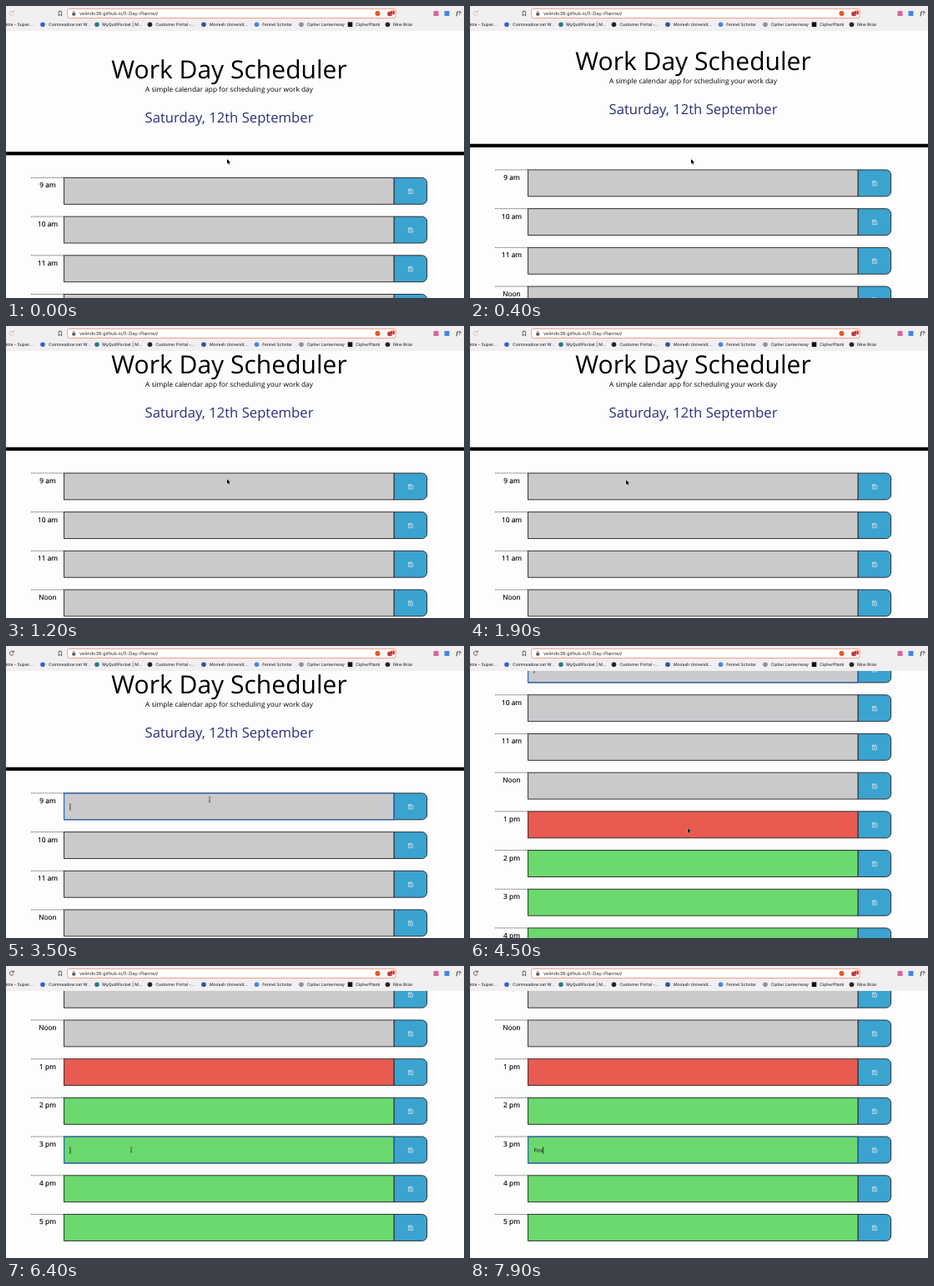
Recreate the animation shown at these times as an HTML page. Size 549 by 351 pixels, loop 8000 ms.

```html
<!DOCTYPE html>
<html lang="en">
<head>
<meta charset="utf-8">
<title>Work Day Scheduler</title>
<style>
  html, body { margin: 0; width: 100%; height: 100%; overflow: hidden; background: #fdfcfe; }
  svg { display: block; width: 549px; height: 351px; text-rendering: geometricPrecision; }
  #page { font: 8.34px "Open Sans", sans-serif; text-anchor: middle; }
  #rows text { stroke: #000; stroke-width: .18; }
  #bar { font: 500 5px Inter, sans-serif; fill: #2c2c2e; }
  .line { fill: none; stroke: #222; stroke-width: .9; }
</style>
</head>
<body>
<svg viewBox="0 0 549 351">
  <g id="page">
    <text x="267.5" y="86.5" font-size="30.05">Work Day Scheduler</text>
    <text x="267.5" y="102.8">A simple calendar app for scheduling your work day</text>
    <text x="267.5" y="139.5" font-size="16.68" fill="#2b3178">Saturday, 12th September</text>
    <rect y="175.2" width="549" height="4.2"/>
    <g id="rows"></g>
    <g id="focus">
      <rect x="69.6" y=".2" width="395.6" height="31.9" fill="none" stroke="#1f6cc4"/>
      <text id="typed" x="76.6" y="18.9" font-size="6.67" text-anchor="start"></text>
      <rect id="caret" y="12.4" width=".7" height="8.6"/>
    </g>
  </g>
  <g id="bar">
    <rect width="549" height="30" fill="#f2eff2"/>
    <g id="reload" fill="none" stroke-width=".8">
      <path d="M9 7.2A2.6 2.6 0 1 0 9.4 9.4M9.4 5.6V7.6H7.4"/>
    </g>
    <path d="M63.2 6.4h3.4v5.4l-1.7-1.5-1.7 1.5z" fill="none" stroke="#444" stroke-width=".8"/>
    <rect x="73.8" y="3.3" width="393.4" height="11.2" rx="1.8" fill="#fff" stroke="#ee9673" stroke-width=".9"/>
    <rect x="79.4" y="8.3" width="3.8" height="3.1" rx=".4" fill="#555"/>
    <path d="M80.2 8.4V7.3a1.1 1.1 0 0 1 2.2 0v1.1" fill="none" stroke="#555" stroke-width=".6"/>
    <text x="88" y="11" font-size="5.7" font-weight="400">velindo38.github.io/5-Day-Planner/</text>
    <path d="M453 4V14" stroke="#ddd" stroke-width=".6"/>
    <circle cx="445.5" cy="9" r="3" fill="#e4512f"/>
    <circle cx="460" cy="9.4" r="2.9" fill="#b8404a"/>
    <rect x="461" y="5.4" width="5" height="4.6" rx="1" fill="#e5342b"/>
    <text x="462.3" y="9.1" font-size="3.8" fill="#fff">1</text>
    <rect x="512.5" y="6" width="6" height="6" fill="#d568a0"/>
    <rect x="525.5" y="6" width="6" height="6" rx=".8" fill="#4585e2"/>
    <text x="539.5" y="11.2" font-size="6.4" font-style="italic" font-weight="600">f?</text>
    <text x="32" y="24.2" text-anchor="end">Note - Super...</text>
    <g id="marks"></g>
  </g>
  <g id="arrow">
    <path d="M0 0V5.6L1.3 4.5 2.2 6.5 3.2 6 2.3 4.1H4z" stroke="#fff" stroke-width=".7" paint-order="stroke"/>
  </g>
  <path id="beam" d="M-1.3-3Q0-3 0-2.3Q0-3 1.3-3M0-2.3V2.3M-1.3 3Q0 3 0 2.3Q0 3 1.3 3M-.7 .9H.7" fill="none" stroke="#333" stroke-width=".6"/>
</svg>
<script>
const el = id => document.getElementById(id);
const LOOP = 8000, TOP = 206.2, PITCH = 46.7;
const GREY = '#cbc9cc', RED = '#e95a51', GREEN = '#6bd96d';
const rowY = i => TOP + i * PITCH;

const hours = ['9 am', '10 am', '11 am', 'Noon', '1 pm', '2 pm', '3 pm', '4 pm', '5 pm'];
const button = 'M465.2 .2H498.6a6 6 0 0 1 6 6V26.1a6 6 0 0 1-6 6H465.2z';
el('rows').innerHTML = hours.map((hour, i) => `
  <g transform="translate(0 ${rowY(i)})">
    <path d="M30 .2H70" stroke="#333" stroke-width=".8" stroke-dasharray="1.25 .85"/>
    <text x="50" y="12.2">${hour}</text>
    <rect class="line" x="69.6" y=".2" width="395.6" height="31.9" style="fill:${i < 4 ? GREY : i > 4 ? GREEN : RED}"/>
    <path class="line" d="${button}" style="fill:#3ba3d0"/>
    <path d="M482.4 13.9h4l1.3 1.3v4h-5.3zM483.6 14.1v1.7h2.3v-1.7M484 17.5h2" fill="none" stroke="#dceff8" stroke-width=".7"/>
  </g>`).join('');

// icon x, icon colour, square?, label x, label
const marks = [
  [44, '#2f66c4', 0, 51, 'Coinmeadow.net W...'],
  [109, '#1d7f86', 0, 115.3, 'MyQuillPocket | M...'],
  [172.5, '#222', 0, 179.3, 'Customer Portal -...'],
  [237, '#245a9c', 0, 244, 'Monash Universit...'],
  [300.5, '#4885e6', 0, 307.3, 'Fennel Scholar'],
  [354, '#8b90a4', 0, 360.5, 'Cipher Lanternway'],
  [412.5, '#111', 1, 419.3, 'CipherPlank'],
  [457.5, '#222', 0, 464, 'Nine Briar']
];
el('marks').innerHTML = marks.map(([x, color, square, tx, label]) =>
  `<rect x="${x - 2.8}" y="19.4" width="5.6" height="5.6" rx="${square ? 0 : 2.8}" fill="${color}"/>
   <text x="${tx}" y="24.2">${label}</text>`).join('');

// linear track through [time, value] points
function track(points, t) {
  const i = points.findIndex(p => p[0] > t);
  if (i < 0) return points[points.length - 1][1];
  if (!i) return points[0][1];
  const [t0, a] = points[i - 1], [t1, b] = points[i];
  return a + (b - a) * (t - t0) / (t1 - t0);
}
const scroll = [[100, 0], [800, 22], [1200, 29.5], [3800, 29.5], [4500, 194.2], [5100, 281.5]];
const mouseX = [[1200, 265], [1850, 187], [2000, 187], [2900, 244], [3600, 244], [4200, 261], [4600, 261], [5200, 174], [5500, 174], [6200, 150]];
const mouseY = [[1200, 184], [1850, 185], [2900, 184.5], [3600, 184.5], [4200, 219], [4600, 219], [5200, 184], [5500, 184], [6200, 221]];
const keys = [7500, 7600, 7750, 7850];
const show = (node, on) => node.setAttribute('visibility', on ? 'visible' : 'hidden');

function draw(t) {
  el('page').setAttribute('transform', `translate(0 ${-track(scroll, t)})`);
  el('reload').setAttribute('stroke', t < 2300 ? '#bbb' : '#444');

  const second = t >= 6400, count = keys.filter(k => k <= t).length;
  const typed = el('typed'), caret = el('caret');
  el('focus').setAttribute('transform', `translate(0 ${rowY(second ? 6 : 0)})`);
  el('focus').setAttribute('display', t < 3200 ? 'none' : 'inline');
  typed.textContent = 'Fini'.slice(0, count);
  caret.setAttribute('x', 76.6 + (count ? typed.getComputedTextLength() : 0));
  const since = count ? keys[count - 1] : second ? 6400 : 3200;
  show(caret, (t - since) % 1000 < 500);

  const place = `translate(${track(mouseX, t)} ${track(mouseY, t)})`;
  const beam = t >= 2300 && t < 3800 || t >= 5000;
  el('arrow').setAttribute('transform', place);
  el('beam').setAttribute('transform', place);
  show(el('arrow'), !beam);
  show(el('beam'), beam && !count);
}

const start = performance.now();
function tick() {
  draw((performance.now() - start) % LOOP);
  requestAnimationFrame(tick);
}
tick();
</script>
</body>
</html>
```
